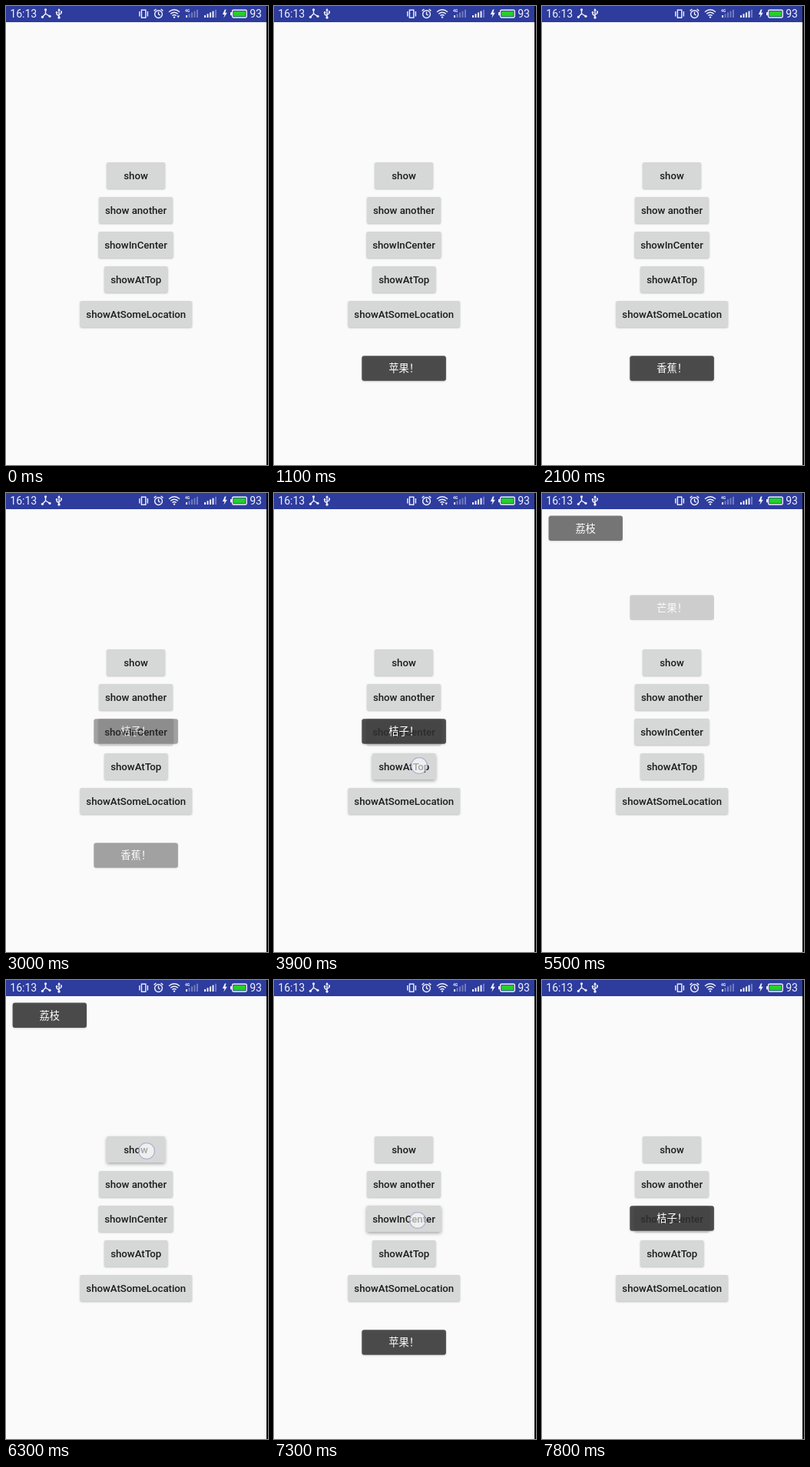
Recreate the animation shown at these times as an HTML page. Size 341 by 596 pixels, loop 8 s.

```html
<!DOCTYPE html>
<html lang="zh-CN">
<head>
<meta charset="utf-8">
<title>Toast demo</title>
<style>
  html, body { margin: 0; width: 100%; height: 100%; overflow: hidden; background: #fafafa; }
  svg { display: block; width: 100%; height: 100%; }
  text { font-family: Roboto, sans-serif; }
  .btn text { font-size: 13.2px; font-weight: 500; fill: #1c1c1c; text-anchor: middle; }
  .toast text { font: 13.2px "Noto Sans CJK SC", "Noto Sans CJK", sans-serif; fill: #fff; text-anchor: middle; }
  .toast rect { fill: rgba(48, 48, 48, .84); filter: drop-shadow(0 1px 1px rgba(0, 0, 0, .2)); }
  .line { fill: none; stroke: #f0f1fa; stroke-width: 1.4; }
  .solid { fill: #f0f1fa; }
</style>
</head>
<body>
<svg viewBox="0 0 341 596">
  <rect width="341" height="596" fill="#fafafa"/>
  <rect width="341" height="21" fill="#2d3c9d"/>
  <g id="status">
    <text class="solid" x="5.3" y="14.7" font-size="14">16:13</text>
    <g class="solid">
      <circle cx="51.5" cy="4.8" r="1.6"/>
      <circle cx="47.4" cy="14.3" r="1.6"/>
      <circle cx="57" cy="13.3" r="1.6"/>
    </g>
    <path class="line" d="M51.5 5V10L47.4 14.3M51.5 10L57 13.3"/>
    <path class="line" stroke-width="1.2" d="M69 5V15M69 13L66 10.8V8.5M69 11.5L72 9.5V7.5"/>
    <path class="solid" d="M69 3L71 6H67ZM71 6.5H73V8.5H71Z"/>
    <circle class="solid" cx="66" cy="8.3" r="1.2"/>
    <circle class="solid" cx="69" cy="15" r="1.7"/>
    <rect class="line" x="176.4" y="5.2" width="5.4" height="10"/>
    <path class="line" d="M173.8 7V13.5M184.4 7V13.5"/>
    <circle class="line" cx="198.5" cy="10.6" r="4.9"/>
    <path class="line" d="M198.5 7.6V10.8L200.8 12M192.6 6.4L195.4 4M201.6 4L204.4 6.4"/>
    <path class="line" d="M212 7.8Q219 1.8 226 7.8M214.2 10.3Q219 6 223.8 10.3M216.4 12.6Q219 10.3 221.6 12.6"/>
    <circle class="solid" cx="219" cy="14.6" r="1.2"/>
    <path id="traffic" class="solid" d="M222.4 12.6H226L224.2 15.6Z"/>
    <text class="solid" x="233" y="8" font-size="5" font-weight="700">4G</text>
    <path class="solid" d="M284.8 4.6L281.8 11H284.4L283.4 15.6L287.8 8.8H285.2L286.6 4.6Z"/>
    <rect class="line" x="294.6" y="5.2" width="18.6" height="9.8" rx="1.4"/>
    <rect class="solid" x="292" y="8" width="2" height="4.2"/>
    <rect x="296.2" y="6.8" width="15.4" height="6.6" fill="#25cf2b"/>
    <text class="solid" x="317.2" y="14.7" font-size="14">93</text>
  </g>
  <g id="buttons"></g>
  <g id="toasts"></g>
  <circle id="touch" r="10.4" fill="#fff" fill-opacity=".6" stroke="#a9a9cf" stroke-opacity=".8" stroke-width="1.3"/>
  <rect x="339" width="2" height="596" fill="#000"/>
</svg>
<script>
const LOOP = 8000, STEP = 100, FADE = 400, HOLD = 200;
const byId = id => document.getElementById(id);

function add(parent, tag, attrs, text) {
  const el = document.createElementNS("http://www.w3.org/2000/svg", tag);
  for (const key in attrs) el.setAttribute(key, attrs[key]);
  if (text) el.textContent = text;
  return parent.appendChild(el);
}

function labelBox(parent, cls, x, y, w, h, rx, text, drop) {
  const g = add(parent, "g", { class: cls });
  const rect = add(g, "rect", { x, y, width: w, height: h, rx });
  add(g, "text", { x: x + w / 2, y: y + h / 2 + drop }, text);
  return { g, rect };
}

function bars(x, bright) {
  for (let i = 0; i < 5; i++) {
    const h = 3 + i * 1.8;
    add(byId("status"), "rect", {
      x: x + i * 3.5, y: 15 - h, width: 2, height: h,
      class: "solid", opacity: i < bright ? 1 : .35
    });
  }
}
bars(234, 1);
bars(258, 4);

const buttons = [
  ["show", 131, 76], ["show another", 121, 96], ["showInCenter", 120.5, 97],
  ["showAtTop", 128, 82.5], ["showAtSomeLocation", 96.5, 145.5]
].map(([name, x, w], i) => {
  const b = labelBox(byId("buttons"), "btn", x, 203 + i * 45, w, 34, 2, name, 4.6);
  b.rect.setAttribute("fill", "#d6d7d7");
  return b;
});

const BOTTOM = [114.3, 454.2, 109.6], CENTER = [114.3, 293.3, 109.6];
const TOP = [114.3, 132.5, 109.6], CORNER = [8.6, 29.5, 96.4];

// Taps: press time, time the toast is settled, button, touch point, toast place and text
const taps = [
  [500, 1100, 0, 183, 222, BOTTOM, "苹果！"],
  [1500, 2100, 1, 187, 267, BOTTOM, "香蕉！"],
  [2700, 3200, 2, 187, 312, CENTER, "桔子！"],
  [3900, 4400, 3, 189, 354, TOP, "芒果！"],
  [5000, 5600, 4, 197, 401, CORNER, "荔枝"],
  [6300, 6800, 0, 183, 222, BOTTOM, "苹果！"],
  [7300, 7800, 2, 187, 312, CENTER, "桔子！"]
].map(([press, end, button, x, y, [tx, ty, tw], text]) => ({
  press, end, button, x, y,
  toast: labelBox(byId("toasts"), "toast", tx, ty, tw, 32.5, 3, text, 4.9).g
}));

const traffic = [[0, 300], [600, 900], [1700, 1900], [2700, 2900], [3900, 4100]];

const clamp = v => Math.max(0, Math.min(1, v));
const progress = (tap, t) => tap ? clamp((t - tap.end + FADE) / FADE) : 0;

function draw(now) {
  const t = Math.floor(now % LOOP / STEP) * STEP;
  const lift = buttons.map(() => 0);
  const touch = byId("touch");
  touch.style.display = "none";

  taps.forEach((tap, i) => {
    const age = t - tap.press;
    if (age >= 0 && age < HOLD) {
      touch.style.display = "";
      touch.setAttribute("cx", tap.x);
      touch.setAttribute("cy", tap.y);
    }
    if (age >= 0) lift[tap.button] = clamp((HOLD + STEP - age) / STEP);
    const alpha = progress(tap, t) * (1 - progress(taps[i + 1], t));
    tap.toast.style.opacity = alpha;
    tap.toast.style.display = alpha ? "" : "none";
  });

  buttons.forEach(({ rect }, i) => {
    const k = lift[i];
    rect.style.filter = `drop-shadow(0 ${1 + k}px ${1 + k}px rgba(0,0,0,${.25 + .08 * k}))`;
  });
  byId("traffic").style.display = traffic.some(([a, b]) => t >= a && t < b) ? "" : "none";
}

let start;
function tick(now) {
  start ??= now;
  draw(now - start);
  requestAnimationFrame(tick);
}
draw(0);
requestAnimationFrame(tick);
</script>
</body>
</html>
```
